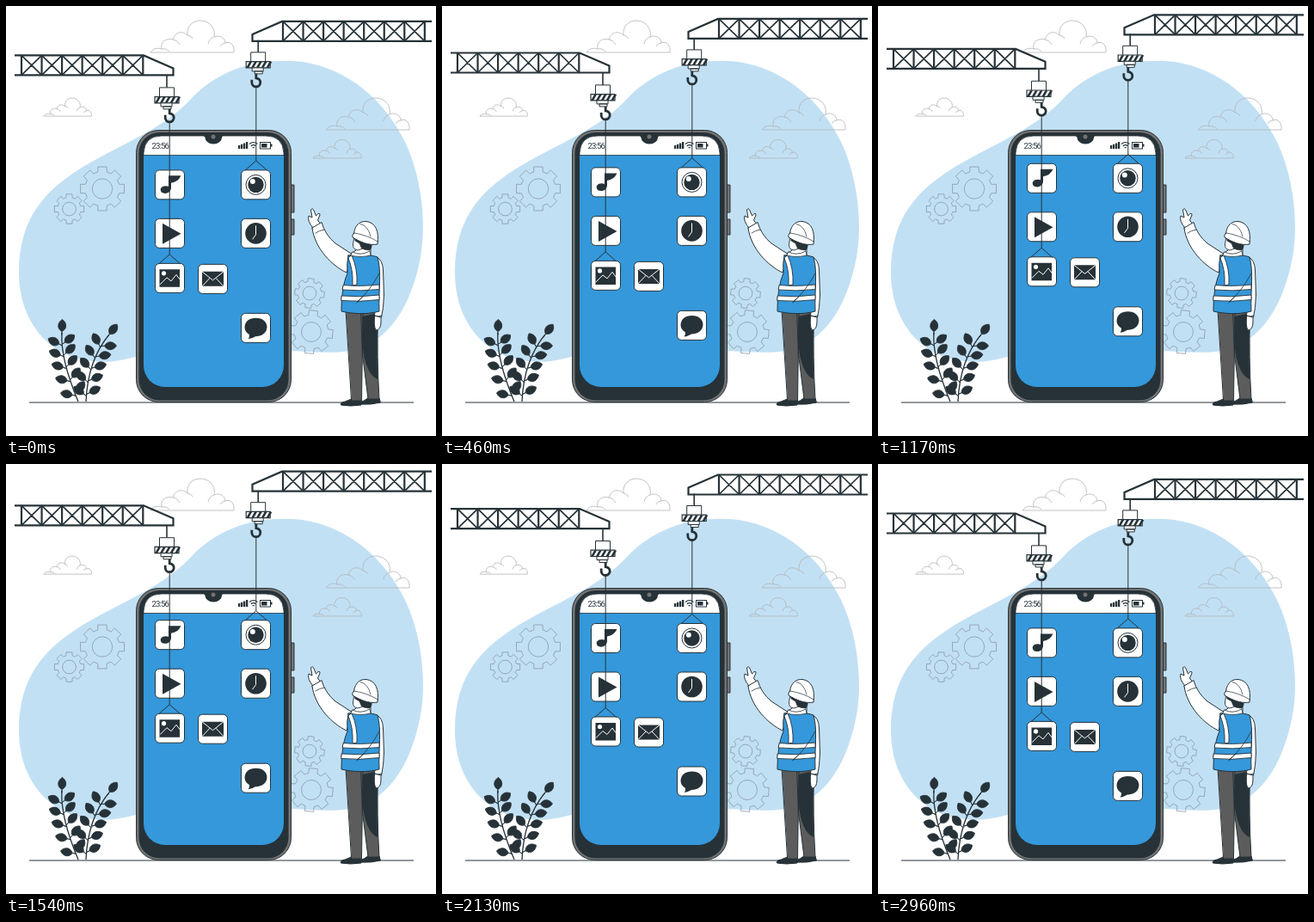
Animation of 500 by 500 pixels, one loop 3 s. Source, as an HTML page:

```html
<!DOCTYPE html>
<html lang="en">
<head>
<meta charset="utf-8">
<title>App under construction</title>
<style>
html, body { margin: 0; width: 100%; height: 100%; overflow: hidden; background: #fff }
svg { display: block; width: 100vw; height: 100vh }
.ink { fill: none; stroke: #263238 }
.dark { fill: #263238 }
.white { fill: #fff; stroke: #263238 }
.leaf { fill: #263238; stroke: #263238; stroke-width: .8 }
.cloud { fill: none; stroke: #b0b4b7; stroke-width: .8 }
.gear { fill: none; stroke: #8799a6; stroke-width: .8; stroke-linejoin: round }
.cloud path { vector-effect: non-scaling-stroke }
text { font: 9.5px Roboto, "Liberation Sans", sans-serif; letter-spacing: -.8px; fill: #263238 }
</style>
</head>
<body>
<svg viewBox="0 0 500 500">
  <path fill="#c2e0f4" d="M15 310C15 246 45 212 100 181C146 155 185 141 217 106C252 71 296 60 345 65C400 74 440 110 464 158C484 200 489 255 482 292C471 350 445 391 400 401C375 405 350 401 325 401L150 408C125 415 105 416 80 409C42 397 15 360 15 310Z"/>
  <g id="back"></g>
  <path class="ink" d="M27 461H474"/>

  <g id="phone">
    <path fill="#737373" stroke="#263238" d="M331 208h4v32h-4zM331 248h4v18h-4z"/>
    <rect x="151.5" y="144.5" width="180" height="316" rx="26" fill="#737373" stroke="#263238"/>
    <rect class="dark" x="154.5" y="147" width="174" height="311.5" rx="24"/>
    <rect x="160" y="151" width="163" height="292" rx="25" fill="#3498db"/>
    <path class="white" stroke-width=".8" d="M160 173.5V171Q161 151 181 151H302Q322 151 323 171V173.5Z"/>
    <path class="dark" d="M228 150H254Q251 151 251 153A9.7 7.5 0 0 1 231.5 153Q231 151 228 150Z"/>
    <circle cx="241" cy="152" r="2.5" fill="#737373"/>
    <text x="169.5" y="166">23:56</text>
    <path class="dark" d="M270 162h2.3v4h-2.3zM273 160.8h2.3v5.2h-2.3zM276 159.4h2.3v6.6h-2.3zM279 158h2.3v8h-2.3zM297 160h6.5v4.5H297zM308 160.5h1.5v3H308z"/>
    <path class="ink" stroke-width="1.2" d="M283 160.5q4.7-4 9.4 0M284.7 162.8q3-2.5 6 0M286.5 165q1.2-1 2.4 0"/>
    <rect class="ink" x="295.5" y="158.5" width="12" height="7.5"/>
  </g>

  <g id="lift">
    <g id="tiles"></g>
    <path class="dark" d="M189 197.5H203.5Q200 205 192 206V212C191 218 185 219.500 181 217C177 212 183 208 189 210Z"/>
    <circle class="white" cx="290.5" cy="208" r="11.5"/>
    <circle class="dark" cx="290.5" cy="208" r="9.2"/>
    <circle cx="286.8" cy="204.2" r="3" fill="#fff"/>
    <path class="dark" d="M182 253L203.5 265L182 277Z"/>
    <circle class="dark" cx="290.5" cy="264.5" r="12.3"/>
    <path d="M290.5 255.5V266L286.5 271.5" fill="none" stroke="#fff"/>
    <path class="dark" d="M178.5 306.5h23.5v20.5h-23.5zM228 309h25v17h-25z"/>
    <circle cx="183.5" cy="311" r="2.6" fill="#fff"/>
    <path fill="none" stroke="#fff" d="M179 324L187 316L192 320L198 312.5L202 318M228 309L240.5 319L253 309M228 326L237 316.5M253 326L244 316.5"/>
    <path class="dark" d="M290.5 363C299 363 303.5 368 303.5 373.5C303 381 297 384.5 290 384.5Q286 387 281.5 387.5Q283.5 385 283 382.5C279 380 277.5 377 277.5 373.5C278 367 283 363 290.5 363Z"/>
    <g id="cranes"></g>
  </g>

  <g id="man" stroke="#263238" stroke-linejoin="round" stroke-linecap="round">
    <path class="dark" d="M402 457L413 458V464Q400 466 389.5 464Q388 461 394 460ZM421 456L434 456L435.5 461Q424 464 412 463Q411 460 416 459Z"/>
    <path fill="#5c5c5c" d="M395.5 355L415 357L413.5 459H402ZM413 356L432.5 356Q431 410 434 457H421L414.5 405Z"/>
    <path class="dark" stroke="none" d="M414.500 361L432.500 357Q431 390 432 434Q418 428 414.500 395Z"/>
    <path class="white" d="M429 358Q427 371 430 377Q436 377 436 367L436 359Z"/>
    <path class="white" d="M431 292Q438 295 438.5 307L439.5 336Q439 352 436.5 362L428.5 360L432 325Z"/>
    <path class="white" d="M357 258Q350 250 352 244L356 246L354.5 237Q356.5 234 358 238L360.5 244Q365 239 365 243L362.5 249L366 254Z"/>
    <path class="white" d="M356 258L367 251.5Q371 266 383 276L403 289L396 310C379 302 359 282 356 258Z"/>
    <path class="white" d="M408 276L407 284L401 288Q411 293 424 290L424 278Z"/>
    <path class="white" stroke-width=".9" d="M405 268L403.5 277Q403 283 409 284L418 281L421 270Z"/>
    <path class="dark" stroke-width=".6" d="M406 268L425 275Q426 281 423 284Q416 284 413 281L411 276L406 273Z"/>
    <path class="white" d="M404.5 264C406 254 412 250 419 250.500C430 252 434 262 432 277C422 279 411 274 403 269Q402 266 404.5 264Z"/>
    <path fill="none" stroke-width=".7" d="M405 264Q419 266 432.5 274M412 253.5Q421 255 424 268"/>
    <path fill="#3498db" d="M398 290C409 288 424 289 432 292C437 309 433 330 434 355C420 359 403 358 390 355C390 338 392 322 397 311Q396 299 398 290Z"/>
    <g class="white" stroke-width=".9">
      <path d="M402 290Q409 305 408 324L403 325Q404 307 398 293Z"/>
      <path d="M392.500 324.500Q412 326.500 434 324V329.500Q412 332 391.500 330ZM390.500 337Q412 339 434 336V341.500Q412 344.500 390 342.500Z"/>
    </g>
    <path fill="none" stroke-width=".8" d="M434 311Q424 330 408 345M416 337L408 344M428 360Q433 362 437 360M360 264Q364 261 370 260"/>
    <path class="white" stroke-width=".8" d="M403 286Q412 291 423 285L424 290Q411 293 401 290Z"/>
  </g>
</svg>
<script>
const $ = id => document.getElementById(id);
const path = (d, cls, width = 1) => `<path class="${cls}" stroke-width="${width}" d="${d}"/>`;

function cloud(x, y, k) {
  return `<g class="cloud" transform="translate(${x} ${y}) scale(${k})"><path d="M0 37C4 31 10 32 13 33C11 24 19 20 26 22C29 12 38 12 43 17C42 5 50 0 58 0C68 0 76 8 74 19C80 16 87 20 87 26C93 23 98 29 97 37ZM13 33q6-1 9 3M26 22q5 0 8 6M43 17q4 0 6 4M74 19q-6 2-7 8M87 26q-4 0-6 4"/></g>`;
}

function gear(x, y, r, turn = 0) {
  const points = [];
  for (let i = 0; i < 8; i++)
    for (const [offset, k] of [[-.26, .78], [-.2, 1], [.2, 1], [.26, .78]]) {
      const a = i * Math.PI / 4 + offset + turn;
      points.push([x + r * k * Math.cos(a), y + r * k * Math.sin(a)]);
    }
  return `<g class="gear"><polygon points="${points.join(' ')}"/><circle cx="${x}" cy="${y}" r="${r * .45}"/></g>`;
}

// Leaves in pairs along a quadratic stem, one more at the tip
function plant(x0, y0, x1, y1, x2, y2) {
  const mix = (a, b, c, t) => a * (1 - t) ** 2 + 2 * b * t * (1 - t) + c * t * t;
  const leaf = (t, side) => {
    const dx = (1 - t) * (x1 - x0) + t * (x2 - x1), dy = (1 - t) * (y1 - y0) + t * (y2 - y1);
    const angle = Math.atan2(dx, -dy) * 180 / Math.PI + side * 58;
    return `<path class="leaf" transform="translate(${mix(x0, x1, x2, t)} ${mix(y0, y1, y2, t)}) rotate(${angle})" d="M0 0L0-4C-6-7-6-14 0-18C6-14 6-7 0-4Z"/>`;
  };
  let out = path(`M${x0} ${y0}Q${x1} ${y1} ${x2} ${y2}`, 'ink', 1.3) + leaf(.96, 0);
  for (let i = 0; i < 5; i++) out += leaf(.07 + i * .175, -1) + leaf(.09 + i * .175, 1);
  return out;
}

function truss(x, y, panels) {
  const step = 23.55;
  let bars = `M${x} ${y}v23`, braces = '';
  for (let i = 0; i < panels; i++) {
    const a = x + i * step, b = a + step;
    bars += `M${b} ${y}v23`;
    braces += `M${a} ${y}L${b} ${y + 23}M${a} ${y + 23}L${b} ${y}`;
  }
  return path(bars, 'ink', 2.2) + path(braces, 'ink', 1.7);
}

// Pulley block hanging at (x, y), hook and cable at hx, sling down to y = end
function pulley(x, y, hx, end) {
  let stripes = '';
  for (let i = 0; i < 5; i++) stripes += `M${x - 14 + i * 5.8} ${y + 18}l4-7h3l-4 7z`;
  return path(`M${x} ${y - 14}v14`, 'ink', 1.6)
    + path(`M${x - 8.5} ${y}h17v12h-17z`, 'white')
    + path(`M${x - 14} ${y + 10.7}h28v7.3h-28z`, 'white', 1.2) + path(stripes, 'dark', 0)
    + path(`M${x - 7} ${y + 18}h13v4h-13zM${x - 4} ${y + 22}h9v3h-9z`, 'white')
    + path(`M${hx} ${y + 25}v5q5 1 5 5a5 5 0 0 1-10 0v-3`, 'ink', 2.8)
    + path(`M${hx} ${y + 39}V${end}M${hx - 12.5} ${end + 11}l12.5-11l12.5 11`, 'ink');
}

$('back').innerHTML = cloud(168, 17, 1) + cloud(44, 107, .57) + cloud(372, 107, 1) + cloud(357, 155.5, .58)
  + gear(112, 212.5, 26) + gear(73.5, 236, 17.5) + gear(355, 379, 25.5, .1) + gear(353, 334, 17.5, .1)
  + plant(84, 460, 63, 410, 65, 380) + plant(93, 460, 95, 412, 120, 382);

$('tiles').innerHTML = [[173.5, 191], [273.5, 191], [173.5, 247.5], [273.5, 247.5], [173.5, 299.5], [223.5, 300.5], [273.5, 357.5]]
  .map(([x, y]) => `<rect class="white" x="${x}" y="${y}" width="34" height="34" rx="5"/>`).join('');

$('cranes').innerHTML = path('M10 57.6H160L194.5 72.5V80.6H10', 'ink', 2.2) + truss(18, 57.6, 6) + pulley(187, 95, 190.2, 289)
  + path('M495 18H321L286.5 33V41H495', 'ink', 2.2) + truss(322, 18, 7) + pulley(293.2, 54, 290.8, 180);

const LOOP = 3000, RISE = 9.7, LEAD = 20;
const start = performance.now();
function draw() {
  const t = (performance.now() - start + LEAD) % LOOP;
  const y = -RISE * (1 - Math.abs(2 * t / LOOP - 1));
  $('lift').setAttribute('transform', `translate(0 ${y})`);
  requestAnimationFrame(draw);
}
draw();
</script>
</body>
</html>
```
